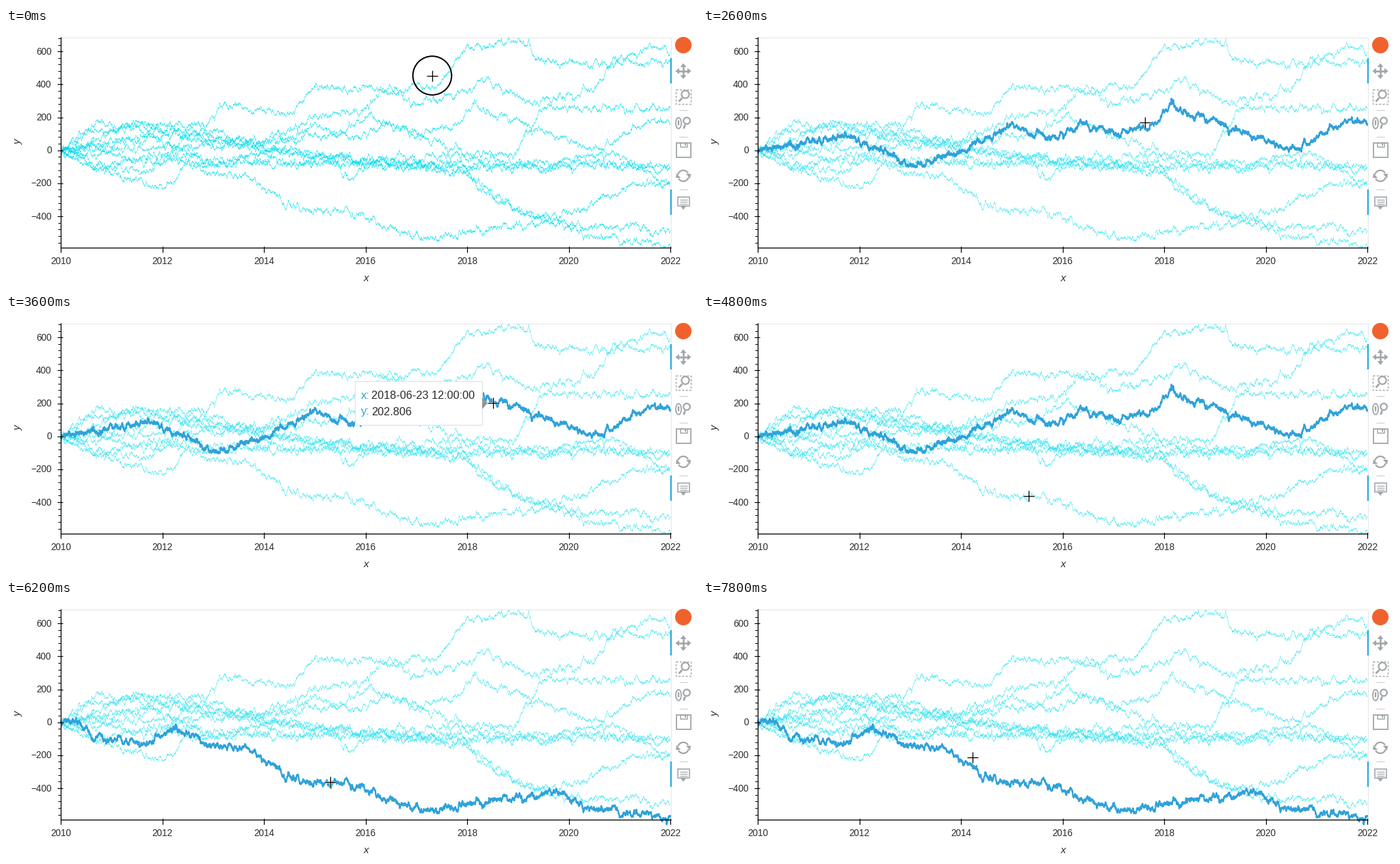
A matplotlib script that plays this animation: 1010x377 px, repeating every 8 s.

```python
import numpy as np
import matplotlib.pyplot as plt
from matplotlib.animation import FuncAnimation
from matplotlib.patches import Arc, Circle, Ellipse, Polygon, Rectangle

W, H, DPI = 1010, 377, 100
LEFT, RIGHT, TOP, BOTTOM = 80, 971, 13, 321
FRAMES, STEP_MS = 40, 200
GREY, BLUE, ACTIVE, INK = "#a1a6a9", "#30a2da", "#26aae1", "#2c2c2c"
PT = 72 / DPI  # points per pixel
YEAR_PX, UNIT_PX, ZERO_Y = 74.25, 0.2408, 178.7

plt.rcParams["font.family"] = "Liberation Sans"
fig = plt.figure(figsize=(W / DPI, H / DPI), dpi=DPI, facecolor="white")
ax = fig.add_axes([0, 0, 1, 1])
ax.axis("off")


def px(years):
    return LEFT + 0.2 + years * YEAR_PX


def py(value):
    return ZERO_Y - UNIT_PX * value


def seg(xs, ys, color="black", width=1.0, z=3, **kw):
    line, = ax.plot(xs, ys, color=color, lw=width * PT, zorder=z,
                    solid_capstyle="butt", **kw)
    return line


def text(x, y, s, size, color=INK, z=3, **kw):
    return ax.text(x, y, s, fontsize=size * PT, color=color, zorder=z, **kw)


def shape(patch, z=3):
    patch.set_zorder(z)
    return ax.add_patch(patch)


def fill(*points, color=GREY, z=3):
    return shape(Polygon(points, fc=color, ec="none"), z)


def outline(x0, y0, x1, y1, width=1.8, **kw):
    return shape(Rectangle((x0, y0), x1 - x0, y1 - y0, fill=False,
                           ec=GREY, lw=width * PT, **kw))


# ---- data: daily noise that keeps returning to a trend ----
DAYS = 4383
YEARS = np.linspace(0, 12, DAYS)
MEMORY = 0.95 ** np.arange(150)


def walk(seed, *turns):
    """Seeded walk along (years since 2010, level) turning points."""
    steps = np.random.default_rng(seed).normal(0, 4.8, DAYS)
    noise = np.convolve(steps, MEMORY)[:DAYS]
    return noise + np.interp(YEARS, *zip((0, 0), *turns))


rising = walk(1, (.6, -95), (1.8, -60), (2.5, 70), (3.9, 45), (5, 190),
              (5.9, 235), (6.3, 350), (7.4, 385), (7.9, 600), (9, 670),
              (9.4, 555), (10.8, 520), (11.8, 640), (12, 600))
middle = walk(2, (1.7, 95), (3, -85), (4.2, 20), (5, 165), (5.7, 60),
              (6.3, 155), (7.1, 105), (7.7, 130), (8.1, 270), (9.3, 125),
              (10.5, 5), (11.8, 190), (12, 150))
falling = walk(3, (.25, 20), (.6, -90), (1.7, -145), (2.2, -20), (2.9, -140),
               (3.8, -175), (4.5, -355), (5.4, -360), (7.2, -535),
               (9.8, -420), (10.5, -530), (12, -570))
chosen = [rising, middle, falling]
others = [
    walk(4, (.7, 150), (2.9, 160), (3.2, 280), (4.5, 200), (5, 395),
         (6.6, 365), (6.9, 280), (8, 350), (8.3, 440), (9.3, 280),
         (10.5, 375), (10.9, 530), (12, 520)),
    walk(5, (2.5, 100), (4, 10), (6, -60), (8.9, -20), (9.5, 245), (12, 250)),
    walk(6, (2.5, 20), (4, 40), (5.5, 100), (6.1, 210), (8.3, -70),
         (12, -100)),
    walk(7, (2, -40), (7.9, -110), (8.6, -330), (10, -460), (12, -480)),
    walk(8, (.6, 120), (3, 130), (4, 0), (7.9, -140), (9.2, -410),
         (10.2, -370), (11.2, -220), (12, -190)),
    walk(9, (1, -140), (2, -235), (2.5, -90), (5.4, -80), (5.7, -190),
         (6, -80), (12, -110)),
    walk(10, (1.5, 170), (3, 60), (5, -40), (9.5, -110), (10.7, 0),
         (12, -195)),
]


def shade(series):
    """Rasterise the walks by hit density, cyan to blue, at double size."""
    fine = np.linspace(0, 12, DAYS * 6)
    x = np.tile(px(fine), len(series))
    y = np.concatenate([py(np.interp(fine, YEARS, s)) for s in series])
    hits = np.histogram2d(
        y, x, bins=(2 * (BOTTOM - TOP), 2 * (RIGHT - LEFT)),
        range=((TOP, BOTTOM), (LEFT, RIGHT)))[0] / 6
    heat = np.clip((hits - .8) / 5, 0, 1)[..., None]
    color = (1 - heat) * np.array([0, .88, .93]) + heat * np.array([0, .45, .9])
    alpha = np.where(hits > 0, .8 + .2 * np.clip(hits / 2, 0, 1), 0)
    rgb = 1 - alpha[..., None] * (1 - color)
    return rgb.reshape(BOTTOM - TOP, 2, RIGHT - LEFT, 2, 3).mean(axis=(1, 3))


raster = ax.imshow(shade(chosen + others), aspect="auto",
                   extent=(LEFT, RIGHT, BOTTOM, TOP), interpolation="nearest",
                   zorder=1)
plot_box = Rectangle((LEFT, TOP), RIGHT - LEFT + 1, BOTTOM - TOP,
                     transform=ax.transData)
picks = [seg(px(YEARS), py(s), BLUE, 2.3, 2, clip_path=plot_box,
             solid_joinstyle="round") for s in chosen]

# ---- axes ----
seg([LEFT, RIGHT + .5, RIGHT + .5], [TOP + .5, TOP + .5, BOTTOM], "#e5e5e5")
seg([LEFT + .2] * 2, [TOP, BOTTOM + .5], width=1.3)
seg([LEFT, RIGHT + 1], [BOTTOM] * 2, width=1.3)
for v in range(-560, 681, 40):
    seg([76, 80], [py(v)] * 2)
for v in range(-400, 601, 200):
    seg([75, 83], [py(v)] * 2, width=1.2)
    text(66.5, py(v) + 4.5, str(v).replace("-", "\u2212"), 13.6, ha="right")
for n in range(0, 13, 2):
    seg([px(n)] * 2, [318.5, 327.5], width=1.2)
    text(px(n), 344.7, str(2010 + n), 13.6, ha="center")
text(526, 369.5, "x", 15, ha="center", style="italic")
text(18, 166.5, "y", 15, ha="center", va="center", style="italic", rotation=90)

# ---- toolbar ----
CX = 990
shape(Circle((CX, 25), 12, fc="#f0622d", ec="none"))
for y in (44, 236):
    seg([972, 972], [y, y + 37], ACTIVE, 2.2, 4)
for y in (120, 159, 236):
    seg([984, 996], [y, y], "#d0d0d0", 1.2)


def lens(x, y, r, hx, hy):
    shape(Circle((x, y), r, fill=False, ec=GREY, lw=2.2 * PT))
    seg([x + (hx - x) * .5, hx], [y + (hy - y) * .5, hy], GREY, 2.8)


# pan
seg([CX - 8, CX + 8], [63, 63], GREY, 2.6)
seg([CX, CX], [55, 71], GREY, 2.6)
for dx, dy in ((1, 0), (-1, 0), (0, 1), (0, -1)):
    bx, by = CX + 6 * dx, 63 + 6 * dy
    fill((CX + 11.5 * dx, 63 + 11.5 * dy), (bx + 4.5 * dy, by + 4.5 * dx),
         (bx - 4.5 * dy, by - 4.5 * dx))

# box zoom and wheel zoom
outline(979, 90, 1001, 111, 1.4, ls=(0, (2.2, 1.6)))
lens(993, 97, 5.6, 983.5, 107.5)
shape(Ellipse((983, 139), 8, 16, fill=False, ec=GREY, lw=1.8 * PT))
seg([983, 983], [135, 142], GREY, 2.4)
lens(995, 135.5, 4.8, 990.5, 147)

# save
outline(979.5, 167.5, 1000.5, 189)
outline(986, 167.5, 996, 174, 1.5)
seg([993, 993], [168, 172], GREY, 2)

# reset
for a in (0, 180):
    shape(Arc((CX, 216), 16, 16, angle=a, theta1=15, theta2=150,
              ec=GREY, lw=2.2 * PT))
fill((1001, 213), (994, 213), (1000, 220))
fill((979, 219), (986, 219), (980, 212))

# hover
outline(981.5, 247, 998.5, 260, 1.6)
for y in (250.5, 253.5, 256.5):
    seg([984.5, 995.5], [y, y], GREY, 1.2)
fill((985.5, 260), (994.5, 260), (CX, 265.5))

# ---- tooltip, laid out around its rest point and shifted with the pointer ----
REST = np.array([712, 130])
tip_box = shape(Rectangle((0, 0), 186, 64, fc="white", ec="#dddddd", lw=PT), 6)
tip_arrow = fill((0, 0), (1, 1), (2, 0), color="#909599", z=6)
tip_text = [text(0, 0, s, 16.3, c, 7) for s, c in
            (("x:", "#2f9fc8"), ("y:", "#2f9fc8"), ("", INK), ("", INK))]
tip = [tip_box, tip_arrow, *tip_text]


def place_tip(x, y):
    dx, dy = x - REST[0], y - REST[1]
    half_days = round(2 * dx * 365.25 / YEAR_PX)
    stamp = np.datetime64("2018-06-23T12:00:00") + np.timedelta64(
        12 * half_days, "h")
    tip_text[2].set_text(str(stamp).replace("T", " "))
    tip_text[3].set_text(f"{202.806 - dy / UNIT_PX:.3f}")
    tip_box.set_xy((x - 202.5, y - 32.5))
    tip_arrow.set_xy([(x - 16, y - 9), (x - 8, y), (x - 16, y + 9)])
    for k, label in enumerate(tip_text):
        label.set_position((x - (193, 178)[k // 2], y - (6.5, -17.5)[k % 2]))


# ---- pointer ----
halo = seg([], [], "white", 3, 8, alpha=.7)
cross = seg([], [], "black", 1.3, 9)
ring = shape(Circle((0, 0), 28.3, fill=False, ec="black", lw=2 * PT), 9)

ax.set_xlim(0, W)
ax.set_ylim(H, 0)

# pointer poses as (time in steps, x, y)
POSES = [(0, 623, 69.5), (6, 638.3, 142.8), (13, 646, 138), (18, *REST),
         (24, 476, 266), (31, 474, 266), (39, 394, 230)]
CLICKS = (0, 6, 25)  # each holds two steps, then selects the next walk
HOVER = range(16, 20)


def pointer(i):
    for (a, *p), (b, *q) in zip(POSES, POSES[1:]):
        if i <= b:
            u = (i - a) / (b - a)
            u = u * u * (3 - 2 * u)
            return np.array(p) * (1 - u) + np.array(q) * u


def draw(i):
    x, y = pointer(i)
    xs = [x - 8, x + 8, np.nan, x, x]
    ys = [y, y, np.nan, y - 8, y + 8]
    halo.set_data(xs, ys)
    cross.set_data(xs, ys)
    ring.center = x, y
    ring.set_visible(any(c <= i < c + 2 for c in CLICKS))
    picked = sum(i >= c + 2 for c in CLICKS) - 1
    raster.set_alpha(1 if picked < 0 else .8)
    for k, line in enumerate(picks):
        line.set_visible(k == picked)
    place_tip(x, y)
    for part in tip:
        part.set_visible(i in HOVER)
    return [raster, *picks, *tip, halo, cross, ring]


anim = FuncAnimation(fig, draw, frames=FRAMES, interval=STEP_MS, repeat=True,
                     repeat_delay=0, blit=False)
plt.show()
```
